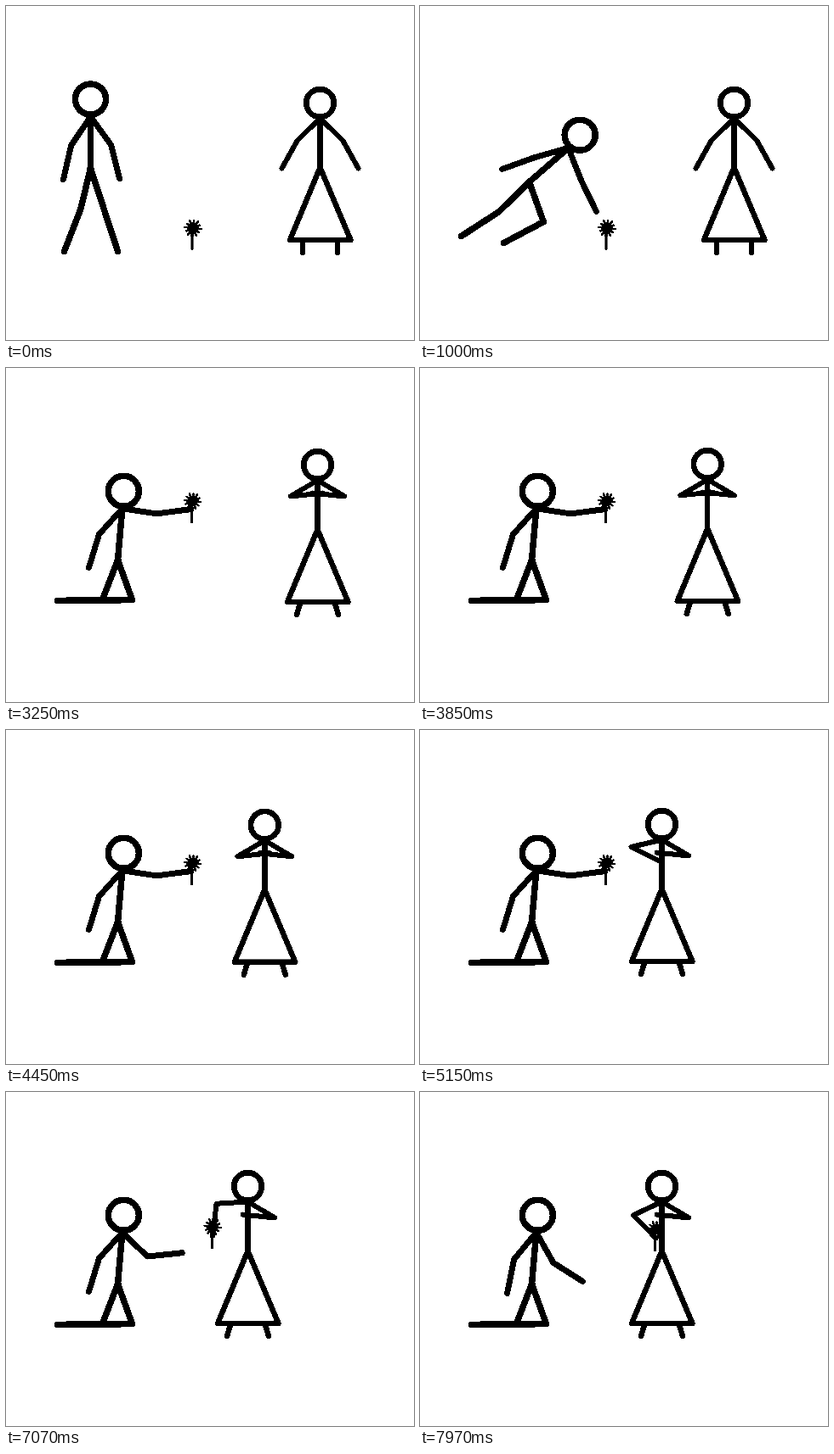
Recreate the animation shown at these times as an HTML page with a canvas. Size 480 by 394 pixels, loop 8000 ms.

```html
<!DOCTYPE html>
<html lang="en">
<head>
<meta charset="utf-8">
<title>A flower for her</title>
<style>
html, body { margin: 0; width: 100%; height: 100%; overflow: hidden; background: #fff; }
/* strong contrast turns soft edges into hard ones */
canvas { display: block; width: 480px; height: 394px; filter: contrast(40); }
</style>
</head>
<body>
<canvas id="stage" width="480" height="394"></canvas>
<script>
const ctx = document.getElementById('stage').getContext('2d');
const LOOP = 8000;
const BEATS = [0, 3250, 7070]; // the 100 ms rhythm restarts at these times

// moments of the story
const CROUCH = 1000, PICK = 1450, RISE = 2200, OFFER = 2850, TAKE = 6450, END = 7970;

function stepTime(t) {
  const base = BEATS.filter(b => b <= t).pop();
  return base + Math.floor((t - base) / 100) * 100;
}

const ramp = (t, from, to) => Math.min(1, Math.max(0, (t - from) / (to - from)));

// move through points: path(t, time, point, time, point, ...)
function path(t, ...keys) {
  let p = keys[1];
  for (let i = 2; i < keys.length; i += 2) {
    const k = ramp(t, keys[i - 2], keys[i]);
    p = p.map((v, j) => v + (keys[i + 1][j] - keys[i - 1][j]) * k);
  }
  return p;
}

const polar = ([x, y], r, lean) => [x + r * Math.sin(lean), y - r * Math.cos(lean)];

function line(width, ...points) {
  ctx.lineWidth = width;
  ctx.beginPath();
  points.forEach(p => ctx.lineTo(...p));
  ctx.stroke();
}

function ring([x, y], r, width) {
  ctx.lineWidth = width;
  ctx.beginPath();
  ctx.arc(x, y, r, 0, Math.PI * 2);
  ctx.stroke();
}

// two bones of length a and b from root to tip; side picks the way the joint bends
function limb(width, root, tip, a, b, side) {
  const dx = tip[0] - root[0], dy = tip[1] - root[1];
  const d = Math.hypot(dx, dy);
  const along = Math.min(a, (d * d + a * a - b * b) / (2 * d));
  const out = side * Math.sqrt(a * a - along * along);
  const joint = [root[0] + (dx * along - dy * out) / d, root[1] + (dy * along + dx * out) / d];
  line(width, root, joint, tip);
}

const manHand = t => path(t, 0, [133, 203], CROUCH, [207, 242], PICK, [218, 271],
  RISE, [229.5, 223], OFFER, [217.5, 166], TAKE, [217.5, 166], END, [191, 223]);

function drawMan(t) {
  const hip = path(t, 0, [99, 191], CROUCH, [128, 207], PICK, [131, 226]);
  const [degrees] = path(t, 0, [0], CROUCH, [49], PICK, [62], RISE, [32], OFFER, [5]);
  const lean = degrees * Math.PI / 180;
  const neck = polar(hip, 61, lean);
  const backHand = path(t, 0, [67, 204], CROUCH, [96, 192], OFFER, [97, 235], 7070, [97, 235], END, [102, 237]);
  const backFoot = path(t, 0, [68, 289], CROUCH, [48, 271], RISE, [40, 274], OFFER, [60, 274]);
  const frontFoot = path(t, 0, [131, 289], CROUCH, [98, 279], PICK, [95, 274]);

  ring(polar(neck, 20.5, lean * 0.85), 18, 7.5);
  line(7.5, neck, hip);
  limb(7.5, hip, backFoot, 50, 53, -1);
  limb(7.5, hip, frontFoot, 50, 53, -1);
  limb(7, neck, backHand, 41, 41, 1);
  limb(7, neck, manHand(t), 41, 41, t < CROUCH ? -1 : 1);
}

function womanNeck(t) {
  const walk = ramp(t, 3350, 4800);
  return [369 - 3 * ramp(t, 2800, 3250) - 82 * walk, 132 - 3 * walk];
}

// hands are measured from the neck
const FOLDED = [6, 15], REACH = [-65, 38];
const foldHand = t => path(t, 2300, [-45, 59], 2700, [-20, 56], 3000, FOLDED);

function womanHand(t) {
  if (t < 4950) return foldHand(t);
  return path(t, 4950, FOLDED, 5350, [-10, 36], 5800, [-38, 64], 6050, [-47, 59],
    6350, REACH, TAKE, REACH, END, [-7, 43]);
}

function drawWoman(t) {
  const spread = 4 * ramp(t, 2800, 3250);
  const neck = [0, 0], waist = [0, 58];
  ctx.save();
  ctx.translate(...womanNeck(t));
  ring([0, -18], 16.3, 6.7);
  line(6.5, neck, waist, [-35.5, 143.5], [36, 143.5], waist);
  for (const side of [-1, 1]) line(6.5, [20.5 * side, 145], [(20.5 + spread) * side, 158.5]);
  limb(6, neck, womanHand(t), 37, 38, 1);
  ctx.scale(-1, 1);
  limb(6, neck, foldHand(t), 37, 38, 1);
  ctx.restore();
}

function flowerPlace(t) {
  if (t < PICK) return [219.5, 261.5];
  const [x, y] = manHand(t);
  if (t < TAKE) return [x + 1.5, y - 9.5];
  const [nx, ny] = womanNeck(t), [hx, hy] = womanHand(t);
  return [nx + hx, ny + hy - 10.5];
}

function drawFlower(t) {
  const [x, y] = flowerPlace(t);
  line(3, [x - 1, y], [x - 1, y + 25]);
  ring([x, y], 2, 4);
  for (let i = 0; i < 12; i++) line(2.7, [x, y], polar([x, y], i % 2 ? 9.5 : 8.5, i * Math.PI / 6 + 0.12));
}

const start = performance.now();
function draw() {
  const t = stepTime((performance.now() - start) % LOOP);
  ctx.setTransform(1, 0, 0, 1, 0.5, 0.5);
  ctx.fillStyle = '#fff';
  ctx.fillRect(-1, -1, 482, 396);
  ctx.strokeStyle = '#000';
  ctx.lineCap = ctx.lineJoin = 'round';
  drawMan(t);
  drawWoman(t);
  drawFlower(t);
  requestAnimationFrame(draw);
}
draw();
</script>
</body>
</html>
```
